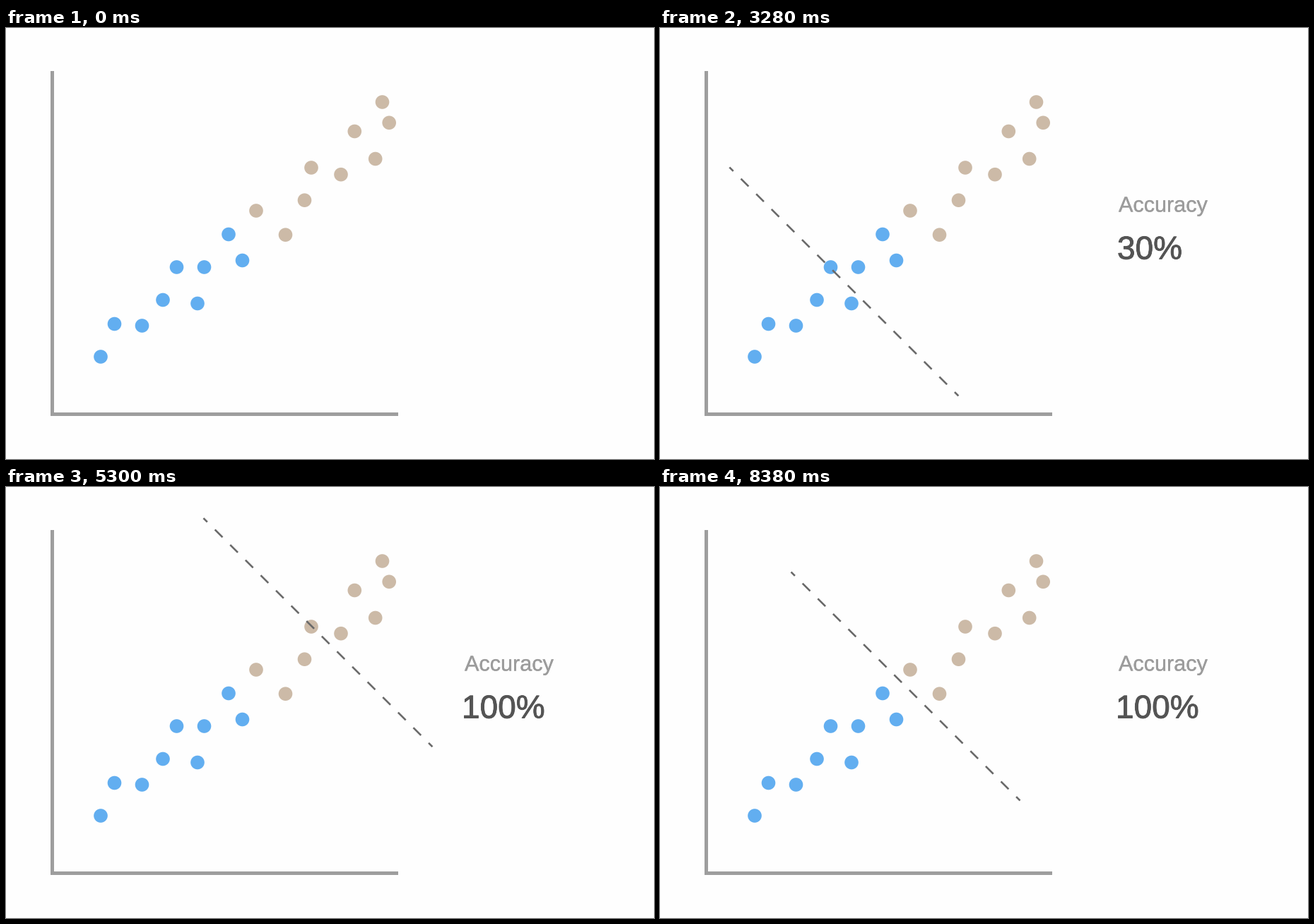
A matplotlib script that plays this animation: 917 by 611 pixels, repeating every 8.4 s.

```python
import numpy as np
import matplotlib.pyplot as plt
from matplotlib.animation import FuncAnimation
from matplotlib.colors import to_rgb
from matplotlib.patches import Circle, Rectangle
from matplotlib.patheffects import withStroke

W, H, DPI = 917, 611, 100
STEP, LOOP = 20, 8400
PX = 72 / DPI

BG, AXIS = "#fefefe", "#9e9e9e"
BLUE, TAN = "#62aef0", "#ccbaa7"
LINE, LABEL, VALUE = "#696969", "#9c9c9c", "#545454"

BLUE_DOTS = [(134, 466), (153.5, 419.5), (192.5, 422), (222, 385.5), (271, 390.5),
             (241.5, 339), (280.5, 339), (334.5, 329.5), (315, 292.5)]
TAN_DOTS = [(354, 259), (395.5, 293.2), (422.5, 244.2), (432, 198), (474, 207.7),
            (493.3, 146.5), (522.7, 185.5), (542.2, 134.3), (532.5, 105)]

# Centres of the boundary line and its dash layout
START, PEAK, REST = map(np.array, [(235.5, 380.5), (448.5, 200.5), (347.5, 282.5)])
HALF, PERIODS = 162, 15

FADE = (1200, 1200)
MOVE_OUT = (3015, 1400)
MOVE_BACK = (5085, 1400)


def ease(t, span):
    """Cubic-bezier(0.4, 0, 0.2, 1) over (start, duration)."""
    u = (t - span[0]) / span[1]
    if u <= 0 or u >= 1:
        return float(u >= 1)
    lo, hi = 0.0, 1.0
    for _ in range(30):
        s = (lo + hi) / 2
        x = 1.2 * s * (1 - s) ** 2 + 0.6 * s * s * (1 - s) + s ** 3
        lo, hi = (s, hi) if x < u else (lo, s)
    return s * s * (3 - 2 * s)


def mix(color, amount):
    a, b = np.array(to_rgb(BG)), np.array(to_rgb(color))
    return tuple(a + (b - a) * amount)


def dash_offsets():
    period = 2 * HALF / PERIODS
    mid = np.arange(PERIODS + 1) * period - HALF
    ends = np.stack([mid - period / 4, mid + period / 4], axis=1).clip(-HALF, HALF)
    gaps = np.full((len(mid), 1), np.nan)
    return np.hstack([ends, gaps]).ravel()


fig = plt.figure(figsize=(W / DPI, H / DPI), dpi=DPI, facecolor=BG)
ax = fig.add_axes([0, 0, 1, 1])
ax.set_xlim(0, W)
ax.set_ylim(H, 0)
ax.axis("off")

ax.add_patch(Rectangle((63, 61), 5, 489, color=AXIS, lw=0))
ax.add_patch(Rectangle((63, 545), 491.5, 5, color=AXIS, lw=0))
for dots, color in ((BLUE_DOTS, BLUE), (TAN_DOTS, TAN)):
    for xy in dots:
        ax.add_patch(Circle(xy, 9.8, color=color, lw=0))

offsets = dash_offsets()
line, = ax.plot([], [], color=LINE, lw=2.6 * PX, solid_capstyle="butt", zorder=3)


def add_text(x, y, text, size, stroke):
    return ax.text(x, y, text, fontsize=size * PX, family="Liberation Sans",
                   va="baseline", path_effects=[withStroke(linewidth=stroke * PX)])


label = add_text(649, 260.5, "Accuracy", 30.6, 0.3)
value = add_text(647, 327.5, "25%", 46, 0.9)


def update(i):
    t = i * STEP
    shown = ease(t, FADE)
    center = (START + (PEAK - START) * ease(t, MOVE_OUT)
              + (REST - PEAK) * ease(t, MOVE_BACK))
    line.set_data(center[0] + offsets, center[1] + offsets)
    line.set_alpha(shown)

    text = "25%" if t < MOVE_OUT[0] else "30%" if t < MOVE_BACK[0] else "100%"
    value.set_text(text)
    value.set_x(645 if text == "100%" else 647)
    for item, color in ((label, LABEL), (value, VALUE)):
        item.set_color(mix(color, shown))
        item.set_visible(shown > 0)
    return line, label, value


anim = FuncAnimation(fig, update, frames=LOOP // STEP, interval=STEP,
                     repeat=True, repeat_delay=0, blit=False)
plt.show()
```
